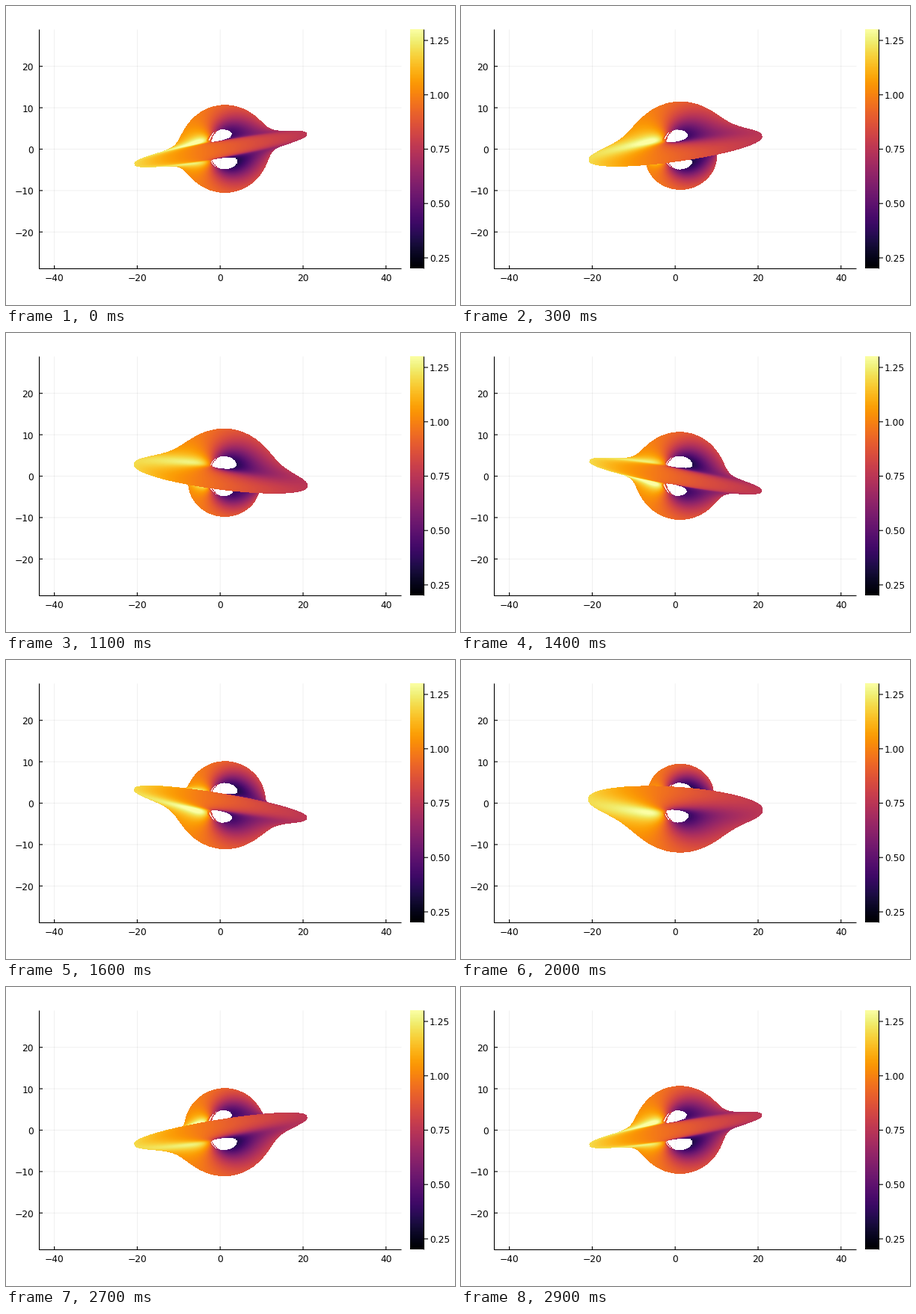
Write a matplotlib script that moves like this. It is 600 by 400 pixels and loops after 3 s.

```python
import numpy as np
import matplotlib.pyplot as plt
from matplotlib.animation import FuncAnimation

plt.rcParams["font.family"] = "DejaVu Sans"

W, H = 600, 400
FRAMES, PHASES = 30, 29            # the last frame repeats the first pose

# Plot geometry in pixels
X0, Y0, SCALE = 286.2, 191.5, 5.54
LEFT, RIGHT, TOP, BOTTOM = 44.5, 528.5, 31.5, 351.5
COL0, COLS, ROWS = 168, 240, 70    # ROWS from the centre line outwards

# Spinning black hole and precessing elliptical disc
SPIN = 0.998
R_IN, R_OUT, HALF_HEIGHT = 3.0, 20.0, 2.0
TILT = np.radians(10)
G_MIN, G_MAX = 0.2, 1.3


def redshift(r, mu, ang):
    """Energy ratio of light from a circular orbit, angular momentum ang."""
    sin2 = 1 - mu**2
    sigma = r**2 + (SPIN * mu) ** 2
    delta = r**2 - 2 * r + SPIN**2
    area = (r**2 + SPIN**2) ** 2 - SPIN**2 * delta * sin2
    omega = 1 / (r**1.5 + SPIN)
    drag = 2 * SPIN * r / area
    v = (omega - drag) * np.sqrt(sin2) * area / (sigma * np.sqrt(delta))
    lapse = np.sqrt(sigma * delta / area)
    return lapse * np.sqrt(np.maximum(1 - v**2, 0)) / (1 - ang * omega)


def slope(s, alpha, beta):
    """Light path in Mino time: direction, its rate, 1/r, its rate, drag angle."""
    a = -SPIN                      # rays are followed backwards
    q, b2 = beta**2, alpha**2 + beta**2
    k = q + (alpha - a) ** 2
    z, u = s[2], s[6]
    d = np.empty_like(s)
    d[:3] = s[3:6]
    d[3:6] = -(b2 + 2 * (a * z) ** 2) * s[:3]
    d[5] += a**2 * z
    d[6] = s[7]
    d[7] = u * (a**2 - b2 + u * (3 * k - 2 * a**2 * q * u))
    d[8] = a * (1 + (a**2 - a * alpha) * u**2) / (1 - 2 * u + (a * u) ** 2) - a
    return d


def rk4(s, h, alpha, beta):
    k1 = slope(s, alpha, beta)
    k2 = slope(s + h / 2 * k1, alpha, beta)
    k3 = slope(s + h / 2 * k2, alpha, beta)
    k4 = slope(s + h * k3, alpha, beta)
    return s + h / 6 * (k1 + 2 * k2 + 2 * k3 + k4)


def disc_distance(s, normals):
    """Signed distance for rays above and, mirrored, below the centre line."""
    r = 1 / np.maximum(s[6], 1e-3)
    c, w = np.cos(s[8]), np.sin(s[8])
    x, y, z = r * (s[0] * c - s[1] * w), r * (s[0] * w + s[1] * c), r * s[2]
    flat = normals[0][:, None] * x + normals[1][:, None] * y
    lift = np.cos(TILT) * z
    thick = HALF_HEIGHT * np.sqrt(np.maximum(1 - (r / R_OUT) ** 2, 0)) + 0.01 * r
    dist = np.abs(np.stack([flat + lift, flat - lift])) - thick
    return np.maximum(dist, np.maximum(r - R_OUT, R_IN - r)), r


def trace():
    """Redshift images for every precession phase."""
    ax_a = (COL0 + np.arange(COLS) + 0.5 - X0) / SCALE
    ax_b = np.arange(ROWS) / SCALE
    alpha, beta = (g.ravel() for g in np.meshgrid(ax_a, ax_b))
    n = alpha.size
    phase = 2 * np.pi * np.arange(PHASES) / PHASES
    normals = np.sin(TILT) * np.array([np.sin(phase), -np.cos(phase)])

    out = np.full((2, PHASES, n), np.nan)
    ray = np.arange(n)
    s = np.zeros((9, n))
    s[0] = s[7] = 1
    s[4], s[5] = alpha, beta
    dist, r = disc_distance(s, normals)

    for step in range(420):
        old, old_dist, old_r = s, dist, r
        s = rk4(s, 0.036 * np.maximum(s[6], 0.03), alpha, beta)
        dist, r = disc_distance(s, normals)
        side, ph, j = np.nonzero((old_dist > 0) & (dist <= 0))
        fresh = np.isnan(out[side, ph, ray[j]])
        side, ph, j = side[fresh], ph[fresh], j[fresh]
        d0, d1 = old_dist[side, ph, j], dist[side, ph, j]
        f = d0 / (d0 - d1)
        hit_r = old_r[j] + f * (r[j] - old_r[j])
        hit_mu = old[2, j] + f * (s[2, j] - old[2, j])
        out[side, ph, ray[j]] = redshift(hit_r, hit_mu, -alpha[j])

        live = (s[6] < 0.92) & ((s[7] > 0) | (s[6] > 0.045))
        if step % 8 == 7 or live.mean() < 0.9:
            if not live.any():
                break
            s, dist, r = s[:, live], dist[:, :, live], r[live]
            ray, alpha, beta = ray[live], alpha[live], beta[live]
        else:
            s[6:8, ~live] = 0      # park finished rays far away

    upper, lower = out.reshape(2, PHASES, ROWS, COLS)
    return np.concatenate([upper[:, :0:-1], lower], axis=1)


images = trace()

fig = plt.figure(figsize=(W / 100, H / 100), dpi=100, facecolor="white")
ax = fig.add_axes([0, 0, 1, 1])
ax.axis("off")


def line(x, y, **style):
    ax.plot(x, y, **{"color": "black", "lw": 0.8, "zorder": 4, "snap": False,
                     "solid_capstyle": "butt", **style})


def grid(x, y):
    line(x, y, alpha=0.07, lw=0.6, zorder=1)


def label(x, y, text, ha):
    ax.text(x, y, text, ha=ha, va="center_baseline", fontsize=8.8)


def signed(v):
    return str(v).replace("-", "\u2212")


for v in range(-40, 41, 20):
    x = X0 + v * SCALE
    grid([x, x], [TOP, BOTTOM])
    line([x, x], [BOTTOM, BOTTOM - 4.5])
    label(x, 363.5, signed(v), "center")
for v in range(-20, 21, 10):
    y = Y0 - v * SCALE
    grid([LEFT, RIGHT], [y, y])
    line([LEFT, LEFT + 4.5], [y, y])
    label(37, y + 0.5, signed(v), "right")
line([LEFT, LEFT, RIGHT], [TOP, BOTTOM, BOTTOM])

# Colour bar
ax.imshow(np.linspace(1, 0, 256)[:, None], cmap="inferno", aspect="auto",
          extent=(540, 558, BOTTOM, TOP), interpolation="nearest", zorder=2)
line([558.5, 558.5], [TOP, BOTTOM])
for v in (0.25, 0.5, 0.75, 1.0, 1.25):
    y = BOTTOM - (v - G_MIN) / (G_MAX - G_MIN) * (BOTTOM - TOP)
    line([558.5, 564], [y, y])
    label(566, y, f"{v:.2f}", "left")

disc = ax.imshow(images[0], cmap="inferno", vmin=G_MIN, vmax=G_MAX, aspect="auto",
                 extent=(COL0, COL0 + COLS, Y0 + ROWS - 0.5, Y0 - ROWS + 0.5),
                 interpolation="nearest", zorder=3)
ax.set_xlim(0, W)
ax.set_ylim(H, 0)


def draw(i):
    disc.set_data(images[i % PHASES])
    return [disc]


anim = FuncAnimation(fig, draw, frames=FRAMES, interval=100, repeat=True,
                     repeat_delay=0, blit=False)
plt.show()
```
